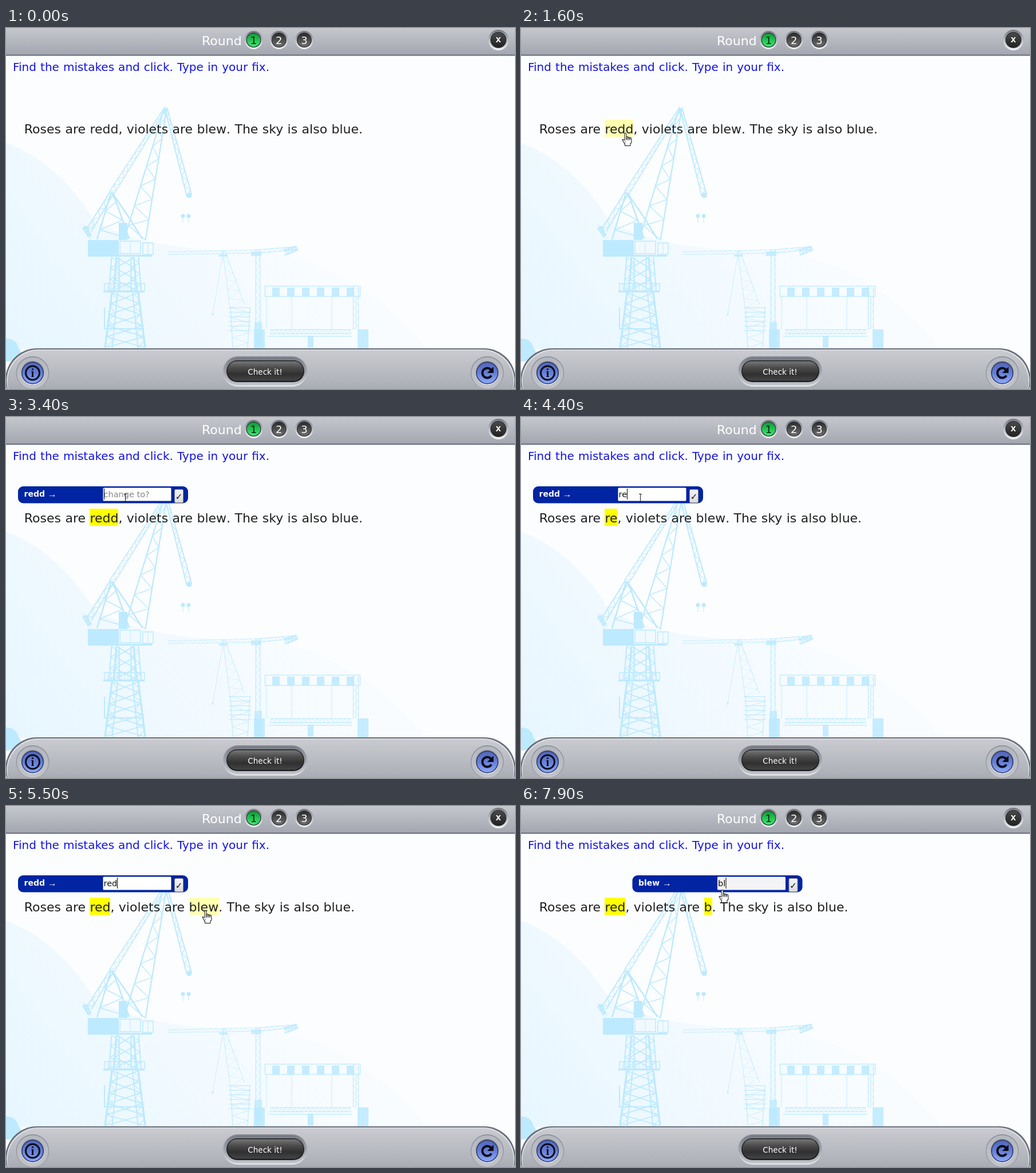
Write an HTML page with a canvas that moves like this. It is 889 by 630 pixels and loops after 8 s.

```html
<!DOCTYPE html>
<html lang="en">
<head>
<meta charset="utf-8">
<title>Find the mistakes</title>
<style>
html, body { margin: 0; width: 100%; height: 100%; overflow: hidden; background: #fcfdff; }
canvas { display: block; }
</style>
</head>
<body>
<canvas id="stage" width="889" height="630"></canvas>
<script>
const W = 889, H = 630, LOOP = 8000, STEP = 100, BLINK = 490;
const SANS = '"DejaVu Sans", Verdana, sans-serif';
const SKY = '#bdeaff', INK = '#0b0d18';
const stage = document.getElementById('stage').getContext('2d');
const backdrop = document.createElement('canvas');
backdrop.width = W;
backdrop.height = H;
let c = backdrop.getContext('2d');

// ---------- drawing helpers ----------
function vgrad(y0, y1, ...colors) {
  const g = c.createLinearGradient(0, y0, 0, y1);
  colors.forEach((col, i) => g.addColorStop(i / (colors.length - 1), col));
  return g;
}
function text(str, x, y, font, color, align = 'left') {
  c.font = font;
  c.fillStyle = color;
  c.textAlign = align;
  c.fillText(str, x, y);
}
function disc(x, y, r, ...colors) {
  c.beginPath();
  c.arc(x, y, r, 0, Math.PI * 2);
  c.fillStyle = colors.length > 1 ? vgrad(y - r, y + r, ...colors) : colors[0];
  c.fill();
}
function pill(x, y, w, h, r, ...colors) {
  c.beginPath();
  c.roundRect(x, y, w, h, r);
  c.fillStyle = colors.length > 1 ? vgrad(y, y + h, ...colors) : colors[0];
  c.fill();
}
function line(width, ...points) {
  c.beginPath();
  for (const p of points) c.lineTo(...p);
  c.lineWidth = width;
  c.stroke();
}
// Two chords joined by a zigzag, a wide at the start and b at the end.
function truss(from, to, a, b, n, width = 1) {
  const dx = to[0] - from[0], dy = to[1] - from[1], len = Math.hypot(dx, dy);
  const at = (f, side) => {
    const d = side * (a + (b - a) * f) / 2 / len;
    return [from[0] + dx * f + dy * d, from[1] + dy * f - dx * d];
  };
  for (const side of [-1, 1]) line(width * 1.6, at(0, side), at(1, side));
  line(width, ...Array.from({ length: n + 1 }, (_, i) => at(i / n, i % 2 ? 1 : -1)));
}
// Outlined box with n upright bars.
function rail(x, y, w, h, n) {
  c.lineWidth = 1.5;
  c.strokeRect(x, y, w, h);
  for (let i = 1; i < n; i++) line(1, [x + w * i / n, y], [x + w * i / n, y + h]);
}

// ---------- scenery ----------
function haze() {
  c.beginPath();
  c.moveTo(0, 200);
  c.quadraticCurveTo(90, 235, 150, 330);
  c.quadraticCurveTo(220, 390, 460, 390);
  c.quadraticCurveTo(620, 420, 735, 560);
  c.lineTo(0, 560);
  const g = c.createLinearGradient(0, 560, 400, 260);
  g.addColorStop(0, '#e7f6ff');
  g.addColorStop(1, '#f8fcff');
  c.fillStyle = g;
  c.fill();
}
function bigCrane() {
  const tip = [279, 139], apex = [185, 287], weight = [145, 353], hook = [320, 292];
  truss(tip, apex, 4, 9, 26);
  truss(tip, [226, 366], 4, 36, 13, 1.4);
  truss(tip, hook, 4, 9, 18, 1.2);
  truss(apex, weight, 7, 9, 8, 1.2);
  truss(weight, [138, 357], 15, 15, 4, 2);
  truss(apex, [187, 368], 3, 56, 5, 1.6);
  line(2.5, apex, [215, 331], [238, 368]);
  c.fillRect(197, 340, 15, 30);
  disc(...hook, 4.5, SKY);
  for (const x of [309, 319]) {
    disc(x, 328, 3.5, SKY);
    line(1, [x, 328], [x, 340]);
  }

  c.fillRect(143, 370, 54, 27);
  c.fillRect(143, 396, 112, 3);
  rail(199, 372, 36, 22, 2);
  rail(239, 375, 18, 20, 2);

  const mid = 208;
  for (const side of [-1, 1]) {
    truss([mid + side * 17, 400], [mid + side * 19, 458], 13, 18, 6, 1.3);
    truss([mid + side * 18, 462], [mid + side * 29, 558], 10, 13, 8, 1.2);
    truss([mid, 462], [mid, 558], side * 46, side * 70, 5, 1.8);
    truss([mid, 400], [mid, 458], side * 30, side * 40, 3, 1.8);
  }
  rail(172, 446, 70, 13, 12);
  line(3, [170, 460], [242, 460]);
  line(2, [172, 488], [172, 525], [241, 525]);
}
function farCranes() {
  const mast = 440, pivot = [380, 388];
  c.globalAlpha = 0.75;
  truss([283, 393], [mast, 390], 5, 6, 36, 0.7);
  truss([mast, 390], [508, 384], 6, 5, 14);
  truss([486, 392], [509, 384], 9, 6, 8, 1.8);
  truss([mast, 386], [mast, 556], 7, 8, 28);
  c.fillRect(428, 390, 18, 8);
  c.fillRect(434, 513, 13, 45);

  line(1, pivot, [361, 500]);
  truss(pivot, [404, 486], 4, 26, 12, 0.7);
  c.fillRect(372, 395, 15, 4);
  disc(361, 500, 2, SKY);
  for (let y = 488; y < 536; y += 8) line(1.4, [389, y], [428, y]);
  truss([409, 488], [409, 558], 34, 26, 8);
  c.globalAlpha = 1;
}
function gantry() {
  c.globalAlpha = 0.85;
  rail(452.5, 450.5, 166, 18, 1);
  for (let x = 465; x < 600; x += 26) c.fillRect(x, 453, 13, 15);
  for (const x of [455, 499, 569, 611]) line(1, [x, 468], [x, 526]);
  truss([611, 452], [611, 526], 9, 9, 12, 0.8);
  truss([461, 530], [603, 530], 7, 7, 36, 0.9);
  line(1.5, [458, 538], [605, 538]);
  c.fillRect(527, 537, 10, 21);
  for (const x of [433, 614]) c.fillRect(x, 526, 19, 33);
  c.globalAlpha = 1;
}
function scenery() {
  c.fillStyle = '#fcfdff';
  c.fillRect(0, 0, W, H);
  haze();
  c.strokeStyle = SKY;
  disc(2, 562, 20, SKY);
  disc(14, 568, 12, SKY);
  bigCrane();
  farCranes();
  gantry();
}

// ---------- bars and buttons ----------
function knob(x, r, rim, top, bottom, label, font, color) {
  const y = 21;
  disc(x, y, r, '#74777f', '#b8bbc2', '#f0f1f3');
  disc(x, y, r - rim, '#2c2f33');
  disc(x, y, r - rim - 1.2, top, bottom);
  text(label, x, y + parseInt(font.match(/\d+/)) * 0.37, font, color, 'center');
}
function blueButton(x, y) {
  disc(x, y, 29, '#858993', '#a4a7af');
  disc(x, y, 27.5, '#b4b7be', '#c2c4ca');
  disc(x, y, 21, '#888c99', '#dfe2ea');
  disc(x, y, 19.5, '#27345f');
  disc(x, y, 18, '#5267bd', '#647ed5', '#8ca8fa');
  c.strokeStyle = INK;
}
function header() {
  c.fillStyle = vgrad(0, 47, '#c5c7cd', '#b4b7be', '#a3a6af');
  c.fillRect(0, 0, W, 47);
  c.fillStyle = '#666b7a';
  c.fillRect(0, 46.5, W, 2);
  text('Round', 342, 29.5, '22px ' + SANS, '#fff');
  for (let i = 0; i < 3; i++) {
    const shades = i ? ['#2b2b2b', '#707070'] : ['#0b9a35', '#3fe873'];
    knob(432.5 + i * 44.2, 16, 3, ...shades, i + 1, '18px ' + SANS, i ? '#fff' : '#06230d');
  }
  knob(860, 18, 4, '#4a4a4a', '#222', 'X', 'bold 12px ' + SANS, '#fff');
  c.wordSpacing = '0.7px';
  text('Find the mistakes and click. Type in your fix.', 12, 75, '20px ' + SANS, '#1313e6');
  c.wordSpacing = '0px';
}
function footer() {
  pill(-1, 559, W + 2, 110, 60, '#686d7c');
  pill(1, 561, W - 2, 110, 58, '#dfe1e5');
  pill(2.5, 562.5, W - 5, 110, 57, '#c9cbd0', '#b0b3ba', '#8f929b');

  pill(379, 573, 147, 53, 26, '#84878f', '#a7aab1', '#e1e3e7');
  pill(381, 575, 143, 48, 24, '#777a82', '#9b9ea6', '#bfc2c8');
  pill(385, 580, 136, 38, 19, '#1d1f22');
  pill(386.5, 581.5, 133, 34, 17, '#777', '#4b4b4c', '#303031', '#454546');
  text('Check it!', 452.5, 605, '13.5px ' + SANS, '#fff', 'center');

  blueButton(46.5, 602);
  c.beginPath();
  c.arc(46.5, 602, 12, 0, Math.PI * 2);
  c.lineWidth = 3;
  c.stroke();
  text('i', 46.5, 608.5, 'bold 21px "Liberation Serif", serif', INK, 'center');

  blueButton(840.5, 602);
  c.beginPath();
  c.arc(840.5, 602, 8.5, 0.55, Math.PI * 1.78);
  c.lineWidth = 4;
  c.stroke();
  c.fillStyle = INK;
  c.beginPath();
  c.moveTo(851.5, 591);
  c.lineTo(851.5, 602);
  c.lineTo(840.5, 602);
  c.fill();
}

// ---------- timeline ----------
const fixes = [
  { word: 'redd', fix: 'red', hover: 1600, open: 2405, keys: [3800, 4300, 4405], shift: 0, field: '#fff' },
  { word: 'blew', fix: 'bl', hover: 5400, open: 6095, keys: [7600, 7900], shift: 173.5, field: '#f4f4f6' }
];
const count = (times, t) => times.filter(k => t >= k).length;
const typed = (f, t) => f.fix.slice(0, count(f.keys, t));
// The sentence follows the field a moment later, the first key most slowly.
function shown(f, t) {
  const n = count(f.keys.map((k, i) => k + (i ? 100 : 200)), t);
  return n ? f.fix.slice(0, n) : f.word;
}

// Each leg glides from one point to another; px and py set the ease of x and y.
const legs = [
  { t0: 200, t1: 300, from: [840, 405], to: [840, 405], look: arrow },
  { t0: 700, t1: 1500, from: [239, 573], to: [187, 192], px: 2, py: 2, look: arrow },
  { t0: 1600, t1: 2500, from: [183, 183], to: [183, 183], look: hand },
  { t0: 2600, t1: 3000, from: [183, 183], to: [209, 141], look: beam },
  { t0: 4600, t1: 5100, from: [209, 141], to: [281, 273], px: 0.6, look: arrow },
  { t0: 5100, t1: 5400, from: [281, 273], to: [350, 183], px: 4, look: arrow },
  { t0: 5400, t1: 5700, from: [350, 183], to: [347, 179], look: hand },
  { t0: 6400, t1: 6600, from: [347, 179], to: [352, 146], look: hand }
];
function pointer(t) {
  const leg = legs.findLast(l => t >= l.t0);
  if (!leg || (t >= 300 && t < 700)) return;
  const { t0, t1, from, to, px = 1, py = 1 } = leg;
  const left = Math.max(0, 1 - (t - t0) / (t1 - t0));
  const x = to[0] + (from[0] - to[0]) * left ** px;
  const y = to[1] + (from[1] - to[1]) * left ** py;
  const inField = x > 170 && x < 288 && y > 123 && y < 147 && t < 5000;
  c.save();
  c.translate(Math.round(x), Math.round(y));
  if (inField) beam();
  else if (leg.look === beam) hand();
  else leg.look();
  c.restore();
}

// ---------- pointer shapes, drawn around their hot spot ----------
function outlined(width) {
  c.strokeStyle = '#111';
  c.lineWidth = width;
  c.lineJoin = 'round';
  c.stroke();
  c.fillStyle = '#fff';
  c.fill();
}
function arrow() {
  c.beginPath();
  c.moveTo(0.5, 0.5);
  c.lineTo(0.5, 16);
  c.lineTo(4, 13);
  c.lineTo(6.5, 18.5);
  c.lineTo(8.5, 17.5);
  c.lineTo(6.2, 12);
  c.lineTo(11, 11.5);
  c.closePath();
  outlined(2);
}
function hand() {
  c.beginPath();
  c.roundRect(-1.5, 1, 2, 14, 1);
  for (let i = 0; i < 3; i++) c.roundRect(1.5 + i * 3, 7 + i, 1.8, 8, 1);
  c.roundRect(-1.5, 11, 11, 7, 2);
  c.rect(-1, 16, 8.5, 6);
  c.moveTo(-5.5, 12);
  c.lineTo(-1.5, 19);
  c.lineTo(0, 14);
  c.closePath();
  outlined(2);
  for (let x = 1; x < 8; x += 3) line(1, [x, 8], [x, 13]);
}
function beam() {
  c.strokeStyle = '#222';
  line(1, [-0.5, -6], [-0.5, 7]);
  for (const y of [-6.5, 7.5]) line(1, [-3, y], [2, y]);
}

// ---------- moving parts ----------
function sentence(t) {
  const font = '22px ' + SANS, [a, b] = fixes;
  const parts = [['Roses are '], [shown(a, t), a], [', violets are '], [shown(b, t), b], ['. The sky is also blue.']];
  let x = 31.8;
  c.wordSpacing = '0.4px';
  for (const [str, f] of parts) {
    c.font = font;
    const w = c.measureText(str).width;
    if (f && t >= f.hover) {
      c.fillStyle = t >= f.open ? '#ffff00' : '#ffffb0';
      c.fillRect(Math.round(x), 160, Math.round(w), 30);
    }
    text(str, x, 184, font, '#202020');
    x += w;
  }
  c.wordSpacing = '0px';
}
function popup(t) {
  const f = fixes.findLast(e => t >= e.open);
  if (!f) return;
  const str = typed(f, t), touched = [f.open, ...f.keys].findLast(k => t >= k);
  c.save();
  c.translate(f.shift, 0);
  pill(21, 121, 297, 29.5, 9, '#0024a2');
  text(f.word, 31.5, 139, 'bold 14px ' + SANS, '#fff');
  text('→', 31.5 + c.measureText(f.word + ' ').width, 139.5, '16px "Liberation Sans", sans-serif', '#fff');
  pill(169.5, 123.5, 119, 23, 1.5, f.field);
  text(str || 'change to?', 170.5, 139.5, '14.5px ' + SANS, str ? '#111' : '#858585');
  if ((t - touched) % (2 * BLINK) < BLINK) {
    c.fillStyle = '#000';
    c.fillRect(Math.round(170.5 + c.measureText(str).width), 125, 1, 19);
  }
  pill(294, 126, 16, 24, 2.5, '#8b8b8b');
  pill(295, 127, 14, 22, 1.5, '#f4f4f4', '#dcdcdc');
  text('✓', 302, 144, '15px ' + SANS, '#111', 'center');
  c.restore();
}
function render(now) {
  const t = Math.floor((now % LOOP) / STEP) * STEP;
  c.drawImage(backdrop, 0, 0);
  popup(t);
  sentence(t);
  pointer(t);
}

scenery();
header();
footer();
c = stage;
let start;
function tick(now) {
  start ??= now;
  render(now - start);
  requestAnimationFrame(tick);
}
render(0);
requestAnimationFrame(tick);
</script>
</body>
</html>
```
